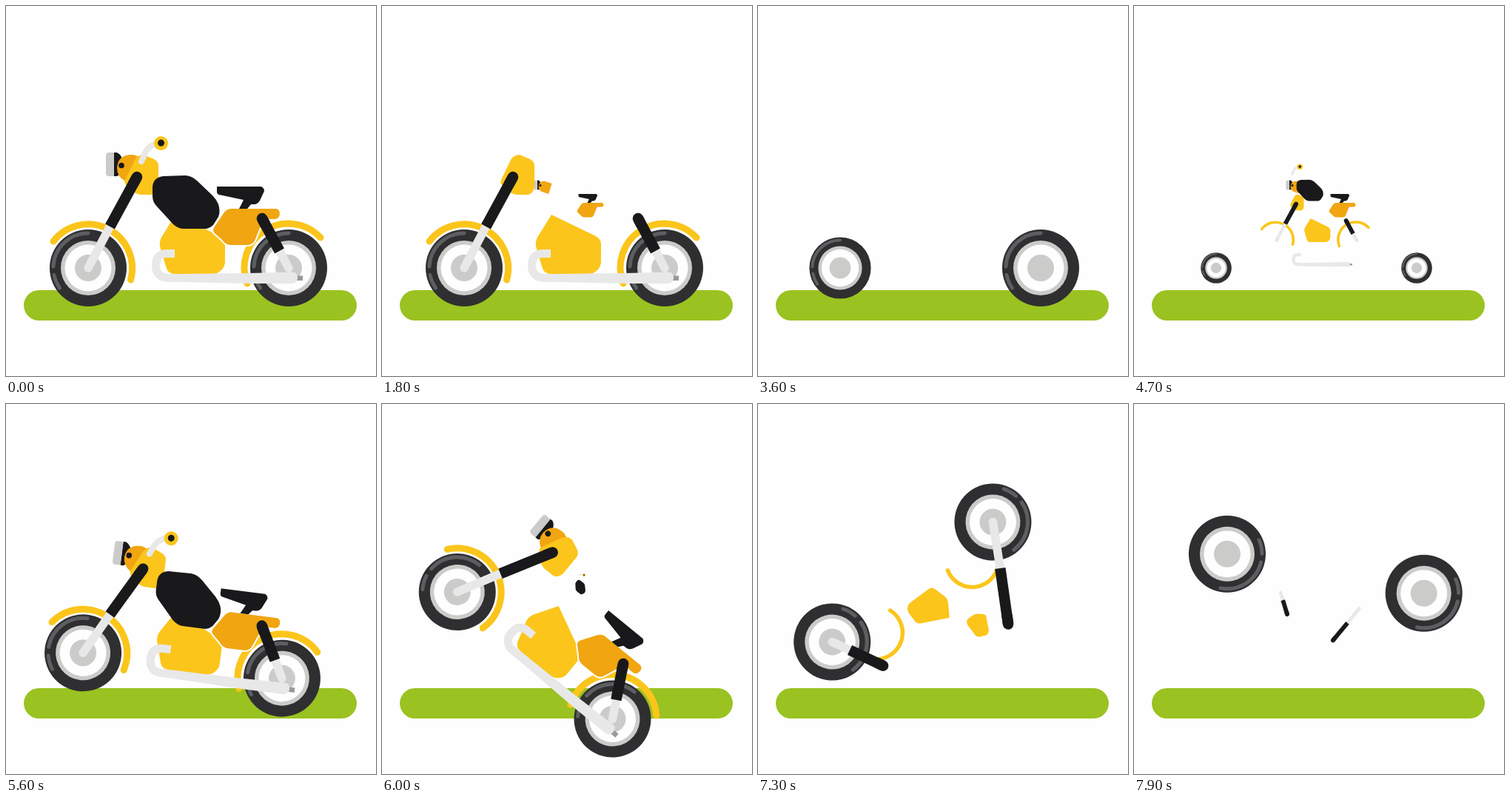
An HTML page that plays this animation: 500x500 px, repeating every 8000 ms.

```html
<!DOCTYPE html>
<html lang="en">
<head>
<meta charset="utf-8">
<title>Motorbike</title>
<style>
  html, body { margin: 0; width: 100%; height: 100%; overflow: hidden; background: #fefefe; }
  svg { display: block; width: 100vw; height: 100vh; }
  .line { fill: none; stroke-linecap: round; }
  .yellow { fill: #fbc51b; }
  .orange { fill: #f1a511; }
  .black { fill: #19191b; }
  .pale { fill: #e8e8e8; }
</style>
</head>
<body>
<svg viewBox="0 0 500 500">
  <defs>
    <g id="wheel">
      <circle r="52" fill="#2f2f31"/>
      <circle r="37" fill="#cbcbc9"/>
      <circle r="31.5" fill="#fefefe"/>
      <circle r="18" fill="#cbcbc9"/>
      <g class="line" stroke="#5d5e62" stroke-width="5">
        <path d="M0 -47A47 47 0 0 0 -47 -2"/>
        <path d="M-46 9.500A47 47 0 0 0 -38.500 27"/>
      </g>
    </g>
  </defs>
  <rect x="24" y="384" width="450" height="41" rx="20.500" fill="#9ac221"/>
  <g id="bike">
    <g data-part="front"><use href="#wheel" x="111" y="354"/></g>
    <g data-part="rear"><use href="#wheel" x="382" y="354"/></g>

    <g data-part="trim">
      <path class="black" d="M146 198H150Q158 202 158 214T150 230H146Z"/>
      <path d="M139 198H146V230H139Q135 230 135 226V202Q135 198 139 198Z" fill="#cbcbc9"/>
      <path class="orange" d="M172 201L195 209L184 244L160 236Q150 230 150 219Q151 202 168 201Z"/>
      <circle class="black" cx="156" cy="215.500" r="3.800"/>
    </g>

    <g data-part="frame">
      <g class="line" stroke="#fbc51b" stroke-width="9">
        <path d="M64 318A59.500 59.500 0 0 1 168.500 370"/>
        <path d="M326 375A59.500 59.500 0 0 1 425 313"/>
      </g>
      <path class="yellow" d="M229 282L289 311Q296 315 296 322V347Q295 353 291 357Q286 362 279 362H228Q220 362 217 355L208 325Q207 317 211 311Z"/>
      <path class="yellow" d="M174 208Q178 201 186 201L200 207Q206 210 206 216V245Q204 254 197 255H182Q175 254 170 249L163 243Q159 239 161 235Z"/>
    </g>

    <g data-part="trim">
      <path class="orange" stroke="#fefefe" stroke-width="4" paint-order="stroke" d="M304 274H365Q370 275 370 281Q369 288 363 288H349Q347 290 345 295L337 315Q334 323 326 323H303Q296 322 293 317L282 307Q278 303 282 298L294 280Q298 274 304 274Z"/>
      <path class="black" d="M285 244H345Q349 246 349 250L343 263Q340 268 335 268H331L326 274H315L321 262L288 255Q285 254 285 251Z"/>
    </g>

    <g data-part="tank">
      <path class="black" d="M212 230Q198 232 198 246V257Q198 265 204 271L226 295Q233 301 240 301H271Q276 300 280 296L287 285Q290 277 287 268Q284 261 279 256L258 236Q250 229 242 229Z"/>
      <path class="line" d="M183 210L187 201Q191 189 204 186" stroke="#e8e8e8" stroke-width="8"/>
      <circle class="yellow" cx="209.500" cy="185.500" r="9.500"/>
      <circle class="black" cx="209.500" cy="185" r="4.500"/>
    </g>

    <g data-part="forks">
      <g class="line" stroke="#e8e8e8" stroke-width="11.500">
        <path d="M141 297L111 354"/>
        <path d="M369 330L382 354"/>
      </g>
      <g class="line" stroke="#19191b" stroke-width="14.500">
        <path d="M177 231L172 240"/>
        <path d="M177 231L140.500 298" stroke-linecap="butt"/>
        <path d="M346 287L350 295"/>
        <path d="M346 287L369.500 331" stroke-linecap="butt"/>
      </g>
    </g>

    <g data-part="exhaust">
      <rect x="392" y="364.500" width="9" height="6.500" fill="#999"/>
      <path d="M228 334.500H217C205 335 202.500 343 202.500 351C202.500 361 209 367.500 218 367.500H242" fill="none" stroke="#e8e8e8" stroke-width="11"/>
      <path class="pale" d="M238 362L330 361L388 359.500Q394 360 394 367T387 375L330 375L238 373Z"/>
    </g>
  </g>
</svg>
<script>
  const LOOP = 8000, STEP = 100, FADE = 500;
  const SPIN_START = 5509, SPIN_TIME = 4500;
  const bike = document.getElementById("bike");

  // Pivot of each part, listed in the order the parts vanish.
  const pivots = {
    tank: [234, 238.5],
    trim: [252.5, 260.5],
    exhaust: [224, 337],
    frame: [245, 290.5],
    forks: [247, 292],
    front: [111, 354],
    rear: [382, 354]
  };
  const parts = Object.entries(pivots).map(([name, pivot], i) => ({
    pivot,
    delay: i * FADE,
    nodes: bike.querySelectorAll(`[data-part="${name}"]`)
  }));

  const ramp = (t, start) => Math.min(1, Math.max(0, (t - start) / FADE));

  function sizeAt(t, delay) {
    if (t < 4500) return 1 - ramp(t, 1000 + delay);
    if (t < 5500) return ramp(t, 4500);
    return 1 - ramp(t, 5600 + delay);
  }

  function draw(t) {
    const turn = Math.max(0, t - SPIN_START) * 360 / SPIN_TIME;
    bike.setAttribute("transform", `rotate(${turn} 246.5 291)`);
    for (const { pivot: [x, y], delay, nodes } of parts) {
      const s = sizeAt(t, delay);
      const move = `translate(${x * (1 - s)} ${y * (1 - s)}) scale(${s})`;
      for (const node of nodes) {
        node.setAttribute("transform", move);
        node.setAttribute("visibility", s > 0 ? "visible" : "hidden");
      }
    }
  }

  const begin = performance.now();
  function tick() {
    const t = (performance.now() - begin) % LOOP;
    draw(Math.floor(t / STEP) * STEP);
    requestAnimationFrame(tick);
  }
  tick();
</script>
</body>
</html>
```
